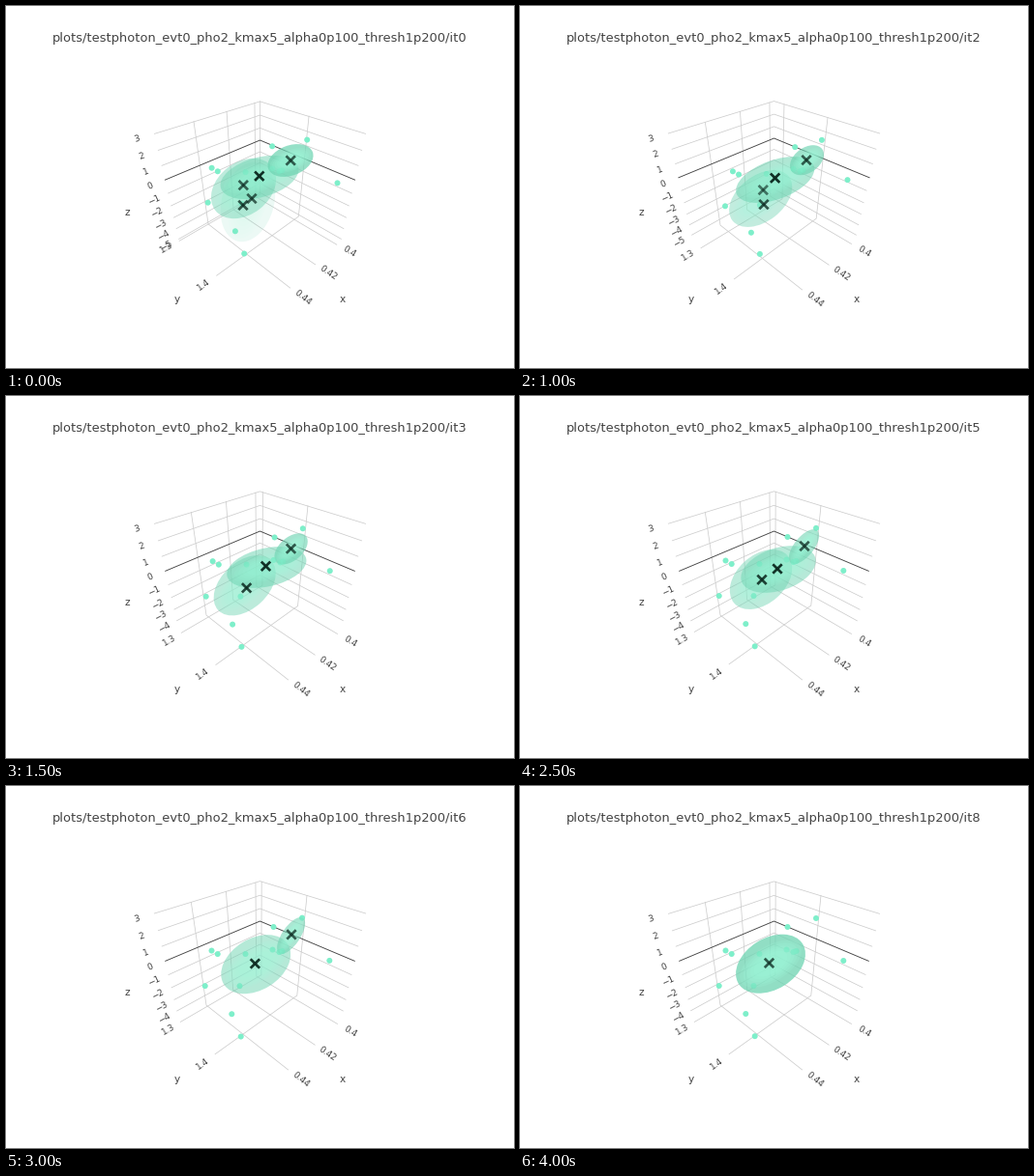
Recreate the animation shown at these times as a matplotlib script. Size 525x375 px, loop 4.5 s.

```python
import numpy as np
import matplotlib.pyplot as plt
from matplotlib.animation import FuncAnimation
from matplotlib.patches import Circle, Ellipse

W, H, DPI = 525, 375, 100
PX = 72 / DPI
INK, GRID, ZERO = "#444444", "#cccccc", "#444444"
DOT, SHELL, GLOW = "#7eefca", "#6ed4b2", "#a2ffe0"
TITLE = "plots/testphoton_evt0_pho2_kmax5_alpha0p100_thresh1p200/it%d"

# Cube positions of: x=0.42, x=0.44, y=1.3, y=1.4, z=0, and the length of one z unit
AXES = [
    (-.1234, .1877, -.498, .030, .1313, .1220),
    (-.118, .210, -.450, .030, .1213, .1252),
    (-.118, .210, -.378, .075, .1511, .1163),
    (-.118, .210, -.465, .020, .1213, .1254),
    (-.118, .210, -.480, .011, .1213, .1254),
    (-.118, .210, -.480, .011, .1213, .1257),
    (-.118, .210, -.480, .011, .1213, .1262),
    (-.118, .210, -.480, .011, .1213, .1254),
]

# Screen x, screen y and cube y of each data point under the last axes
POINTS = [
    (306, 137, .25), (276.5, 146, -.30), (334.3, 181, .49),
    (212.5, 170.5, -.48), (218.7, 174, -.45), (205.7, 207, -.25),
    (233.3, 236, -.05), (242.7, 259.2, .0), (247.5, 174, -.30),
    (275.5, 169.5, -.20), (282.5, 172, -.15), (285.5, 171, -.15),
    (241.5, 207, -.15),
]

# Ellipsoid outlines: centre, half axes, tilt in degrees, opacity
BLOBS = [
    [(250, 203, 42, 27, 75, .13), (245.5, 189, 37, 27, 38, .45),
     (262, 177.5, 41.5, 20.6, 15, .50), (294, 160, 24.5, 15.5, 21, .72)],
    [(248, 208, 31, 19, 62, .15), (241, 193.5, 37.5, 26, 46, .50),
     (260.5, 181, 42, 20.7, 20, .50), (293.7, 160.5, 22, 14.4, 29, .68)],
    [(248.7, 199.5, 37, 23.6, 38, .42),
     (263.7, 180, 42.5, 20.2, 20, .55), (296.5, 159.7, 19.5, 12.9, 36, .66)],
    [],
    [(244.7, 193, 38, 25, 48, .50),
     (275, 175, 41.2, 19.5, 5, .52), (292.7, 157, 21, 11, 46, .60)],
    [(249, 190, 37, 25, 42, .46),
     (267, 179.5, 40, 22, 18, .50), (293.5, 156, 21.5, 10, 51, .58)],
    [(258.2, 184.7, 39, 26.5, 32, .51), (294.6, 155, 22, 9.3, 56, .58)],
    [(259, 184.2, 39, 26.5, 32, .76)],
]

# Cluster centres: x, y, darkness
MARKS = [
    [(245.3, 185.6, .72), (254, 199.5, .72), (245, 206.4, .78),
     (294.2, 160, .75), (261.8, 176.2, .97)],
    [(244, 190.3, .62), (249.8, 206.4, .80), (293.8, 160.6, .75), (260, 178.7, .95)],
    [(251.3, 190.6, .62), (252, 205.6, .78), (296, 159.6, .75), (263.6, 178.2, .97)],
    [],
    [(245.2, 192, .92), (293, 156.7, .75), (273.4, 174.4, .95)],
    [(250, 190.3, .88), (294, 155.5, .75), (266, 179, .95)],
    [(295, 153.9, .75), (257.4, 184, .95)],
    [(257.5, 183.4, .76)],
]


def midway(a, b):
    return [tuple((u + v) / 2 for u, v in zip(p, q)) for p, q in zip(a, b)]


BLOBS[3] = midway(BLOBS[2], BLOBS[4])
MARKS[3] = midway(MARKS[2][1:], MARKS[4])

# Perspective view from (1.25, 1.25, 1.25) with a 45 degree field of view
CX, CY = 262.5, 195.0
FOCAL = 120 / np.tan(np.pi / 8)
DIST = 1.25 * np.sqrt(3)
KX, KY = FOCAL / np.sqrt(2), FOCAL / np.sqrt(6)


def project(x, y, z):
    d = DIST - (x + y + z) / np.sqrt(3)
    return np.array([CX + KX * (y - x) / d, CY - KY * (2 * z - x - y) / d])


def unproject(sx, sy, y):
    p, q = (sx - CX) / KX, (CY - sy) / KY
    d = (DIST - np.sqrt(3) * y) / (1 + (q - 3 * p) / (2 * np.sqrt(3)))
    return y - p * d, y, y + (q - p) * d / 2


def remap(v, old, new):
    """Carry a cube position from one pair of tick positions to another."""
    return new[0] + (v - old[0]) * (new[1] - new[0]) / (old[1] - old[0])


def move(point, axes):
    last = AXES[-1]
    x, y, z = point
    return (remap(x, last[0:2], axes[0:2]), remap(y, last[2:4], axes[2:4]),
            axes[4] + (z - last[4]) * axes[5] / last[5])


CLOUD = [unproject(*p) for p in POINTS]

fig = plt.figure(figsize=(W / DPI, H / DPI), dpi=DPI, facecolor="white")
ax = fig.add_axes([0, 0, 1, 1])


def line(*corners, color=GRID, width=.75):
    pts = np.array([project(*c) for c in corners])
    ax.plot(pts[:, 0], pts[:, 1], color=color, lw=width * PX,
            solid_joinstyle="round", zorder=1)


def label(text, spot, size, angle=0):
    ax.text(*spot, text, size=size * PX, color=INK, rotation=angle,
            ha="center", va="center", family="DejaVu Sans", zorder=6)


def tick(text, inner, edge, outer):
    """Write a tick text beyond the end of its grid line, along its slope."""
    a, b = project(*inner), project(*edge)
    dx, dy = (a - b) if a[0] > b[0] else (b - a)
    label(text, project(*outer), 9, np.degrees(np.arctan2(-dy, dx)))


def draw_axes(axes):
    x42, x44, y13, y14, z0, unit = axes
    lo, hi, out, far = -.5, .5, .62, .825
    for text, x in (("0.4", 2 * x42 - x44), ("0.42", x42), ("0.44", x44)):
        line((x, lo, hi), (x, lo, lo), (x, hi, lo))
        tick(text, (x, lo, lo), (x, hi, lo), (x, out, lo))
    for text, y in (("1.3", y13), ("1.4", y14)):
        line((lo, y, hi), (lo, y, lo), (hi, y, lo))
        tick(text, (lo, y, lo), (hi, y, lo), (out, y, lo))
    for n in range(-5, 4):
        z = z0 + n * unit
        if z < lo:
            continue
        if n:
            line((hi, lo, z), (lo, lo, z), (lo, hi, z))
        else:
            line((hi, lo, z), (lo, lo, z), (lo, hi, z), color=ZERO, width=.9)
        tick(str(n).replace("-", "\u2212"), (lo, lo, z), (hi, lo, z), (out, lo, z))
    label("x", project(0, far, lo), 10.5)
    label("y", project(far, 0, lo), 10.5)
    label("z", project(far, lo, 0), 10.5)


def draw_blob(x, y, a, b, tilt, alpha):
    def oval(scale_a, scale_b, color, opacity):
        ax.add_patch(Ellipse((x, y), 2 * a * scale_a, 2 * b * scale_b, angle=-tilt,
                             fc=color, ec="none", alpha=opacity, zorder=3))
    oval(1, 1, SHELL, alpha)
    for s in np.linspace(.92, .5, 5):
        oval(s, s * .75, GLOW, alpha * .22)


def draw_mark(x, y, dark):
    r = 4.7
    for s in (1, -1):
        ax.plot([x - r, x + r], [y - s * r, y + s * r], color="#0c2a20",
                alpha=dark, lw=2.7 * PX, solid_capstyle="butt", zorder=5)


def draw(k):
    ax.clear()
    ax.set_xlim(0, W)
    ax.set_ylim(H, 0)
    ax.axis("off")
    i = min(k, len(AXES) - 1)
    draw_axes(AXES[i])
    for point in CLOUD:
        spot = project(*move(point, AXES[i]))
        ax.add_patch(Circle(spot, 2.9, fc=DOT, ec="none", zorder=2))
        ax.add_patch(Circle(spot, 2.9, fc=DOT, ec="none", alpha=.45, zorder=4))
    for blob in BLOBS[i]:
        draw_blob(*blob)
    for mark in MARKS[i]:
        draw_mark(*mark)
    ax.text(262, 37.5, TITLE % k, size=13.05 * PX, color=INK, ha="center",
            va="baseline", family="DejaVu Sans", parse_math=False)
    return []


anim = FuncAnimation(fig, draw, frames=9, interval=500, repeat=True,
                     repeat_delay=0, init_func=lambda: draw(0))
plt.show()
```
